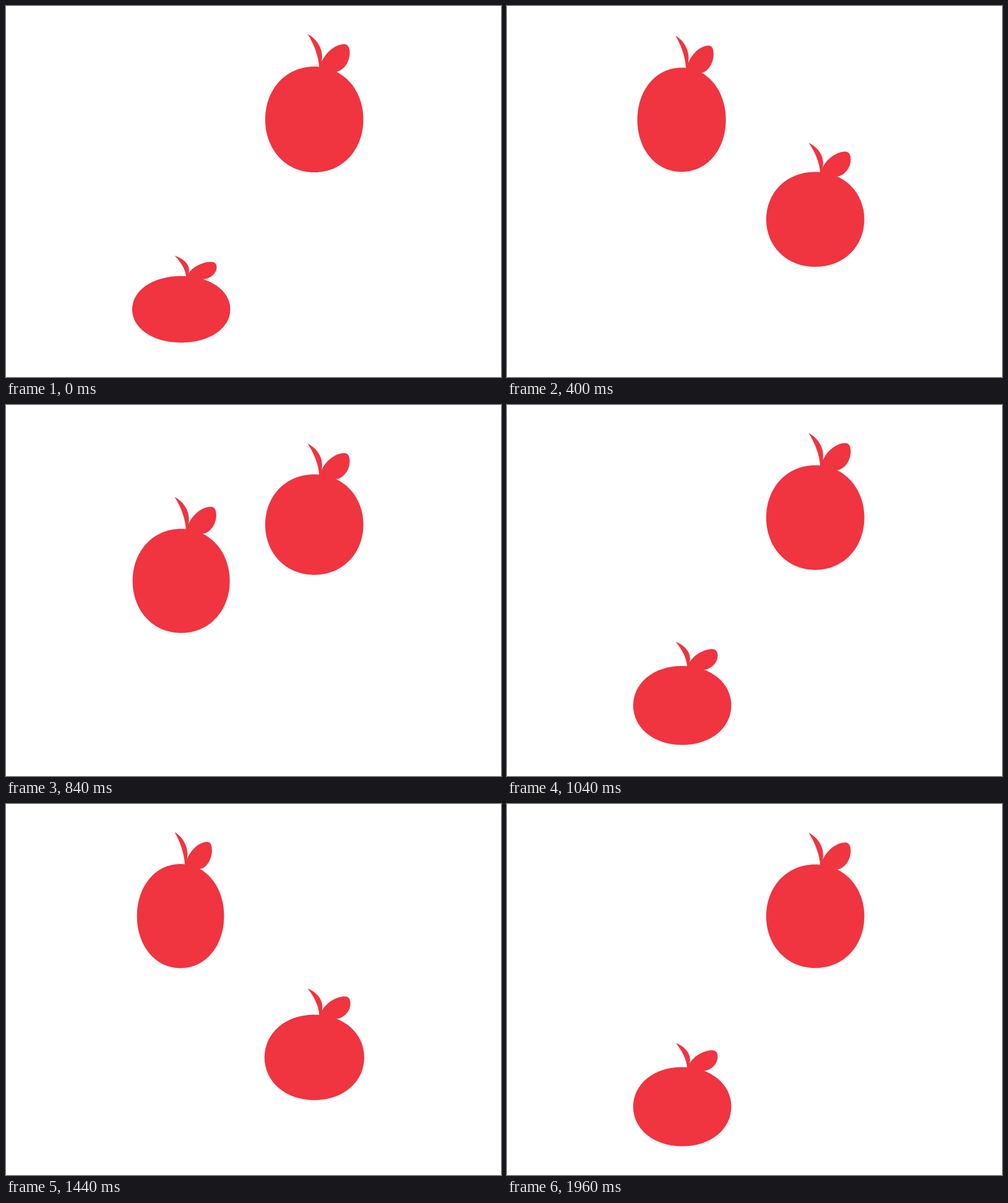
Recreate the animation shown at these times as an HTML page with a canvas. Size 800 by 600 pixels, loop 2000 ms.

```html
<!DOCTYPE html>
<html lang="en">
<head>
<meta charset="utf-8">
<title>Bouncing fruit</title>
<style>
  html, body { margin: 0; width: 100%; height: 100%; overflow: hidden; background: #fff; }
  canvas { display: block; width: 800px; height: 600px; }
</style>
</head>
<body>
<canvas id="stage" width="800" height="600"></canvas>
<script>
const ctx = document.getElementById('stage').getContext('2d');
const STEP = 40, STEPS = 50, BEAT = 25, REACH = 12;
const RED = '#f03440';

// Outlines in units where the stem tip is the origin.
const sprout = new Path2D(
  'M0 0C15 7 26.5 22 22.7 40C30 25 46 14.4 59 14.4C65.5 14.4 68 19.5 68 27' +
  'C68 41 57 54 45.5 54.4L32 72L18.5 62L18.5 47.5C18 33 10 14 0 0Z');
const body = roundBody(10.7, 123.85, 79.3, 76.85);

// An oval a little fuller than an ellipse, flattest at top and bottom.
function roundBody(cx, cy, a, b) {
  const path = new Path2D(), kx = a * 0.59, ky = b * 0.56;
  path.moveTo(cx, cy - b);
  path.bezierCurveTo(cx + kx, cy - b, cx + a, cy - ky, cx + a, cy);
  path.bezierCurveTo(cx + a, cy + ky, cx + kx, cy + b, cx, cy + b);
  path.bezierCurveTo(cx - kx, cy + b, cx - a, cy + ky, cx - a, cy);
  path.bezierCurveTo(cx - a, cy - ky, cx - kx, cy - b, cx, cy - b);
  return path;
}

const mix = (a, b, k) => a + (b - a) * k;

// 1 at distance 0, fading evenly to 0 at the given width.
const pulse = (dist, width) => Math.max(0, 1 - Math.abs(dist) / width);

// Slow start, hard landing: cubic bezier (1, 0, p, 1), solved by bisection.
function fall(u, p) {
  let lo = 0, hi = 1;
  for (let i = 0; i < 30; i++) {
    const s = (lo + hi) / 2, r = 1 - s;
    if (3 * r * r * s + 3 * r * s * s * p + s * s * s < u) lo = s; else hi = s;
  }
  return lo * lo * (3 - 2 * lo);
}

// How far down a fruit is, 0 to 1, from the landing nearest in time.
function depth(n, lands, firstDrop) {
  let d = 0;
  lands.forEach((land, i) => {
    const before = n < land;
    const width = before && i === 0 ? firstDrop : REACH;
    d = Math.max(d, fall(pulse(n - land, width), before ? 0.73 : 0.75));
  });
  return d;
}

const fruits = [
  { // stretches thin at the top, squashes on landing
    x: 272.5, top: 44.6, low: 403.7, lands: [0, 25, 50], firstDrop: REACH,
    sx: b => 1 - 0.129 * pulse(b - 12.25, 9.5),
    sy: b => 1.096 - 0.395 * pulse(Math.min(b, BEAT - b), 3)
  },
  { // grows tall away from the ground, spreads on landing
    x: 487.5, top: 45.6, low: 405.5, lands: [13, 38], firstDrop: 13,
    sx: b => 1 + 0.05 * pulse(b - 13, 3),
    sy: b => 1 - 0.3 * pulse(b - 13, 3) + 0.0113 * Math.max(0, Math.abs(b - 13) - 3)
  }
];

function draw(n) {
  ctx.setTransform(1, 0, 0, 1, 0, 0);
  ctx.fillStyle = '#fff';
  ctx.fillRect(0, 0, 800, 600);
  ctx.fillStyle = RED;
  for (const f of fruits) {
    const b = n % BEAT;
    const y = mix(f.top, f.low, depth(n, f.lands, f.firstDrop));
    ctx.setTransform(f.sx(b), 0, 0, f.sy(b), f.x, y);
    ctx.fill(body);
    ctx.fill(sprout);
  }
}

const start = performance.now();
function tick() {
  const t = Math.max(0, performance.now() - start);
  draw(Math.floor(t / STEP) % STEPS);
  requestAnimationFrame(tick);
}
tick();
</script>
</body>
</html>
```
